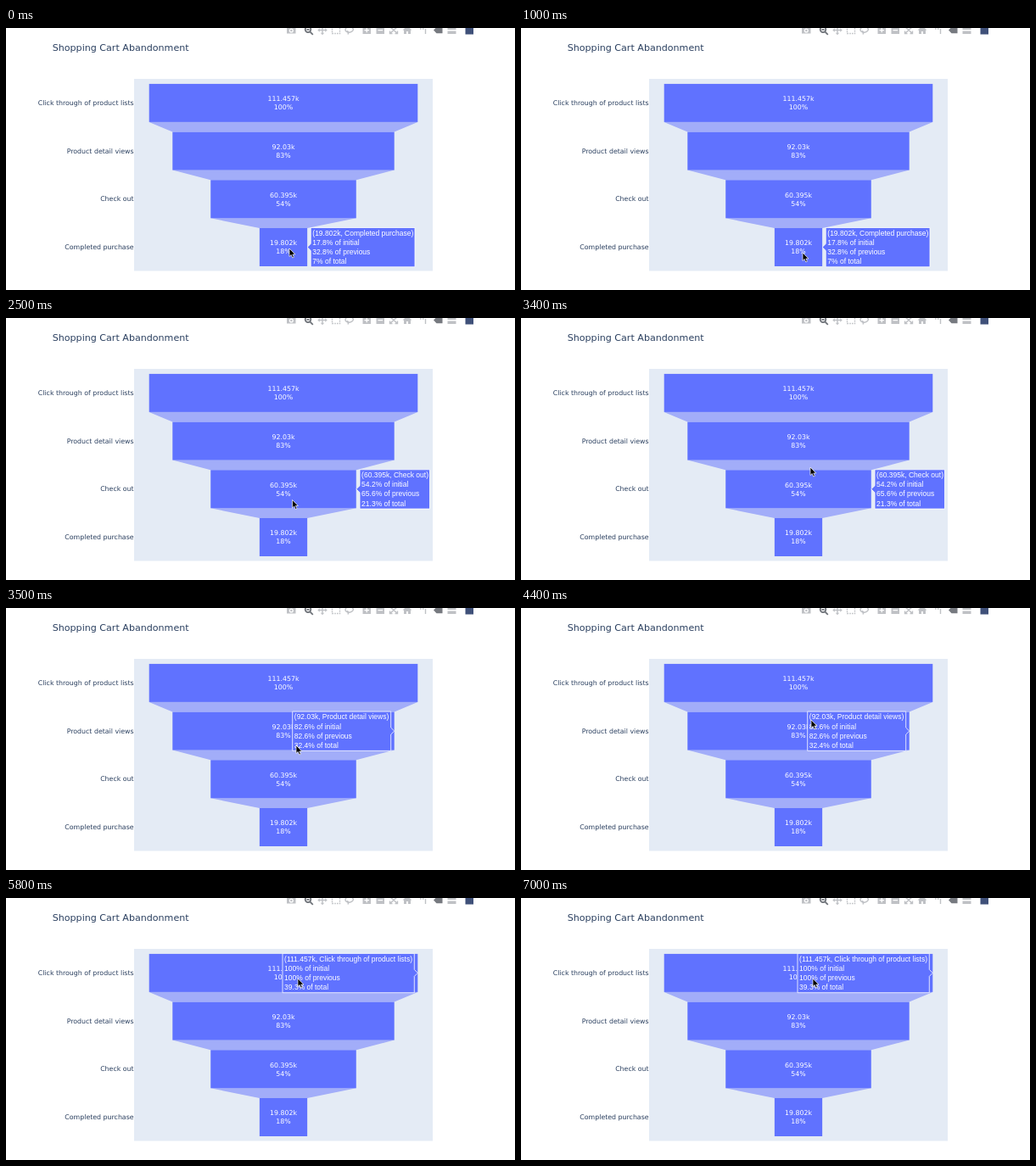
An HTML page for the animation above (7.2 s loop, 600 by 309 pixels).

```html
<!DOCTYPE html>
<html lang="en">
<head>
<meta charset="utf-8">
<title>Shopping Cart Abandonment</title>
<style>
  html, body { margin: 0; width: 100%; height: 100%; overflow: hidden; background: #fff; }
  svg { display: block; width: 600px; height: 309px; }
  text { font-family: "DejaVu Sans", Verdana, sans-serif; font-size: 7.85px; fill: #2a3f5f; }
  .title { font-size: 11.1px; }
  .tick { text-anchor: end; }
  .value { text-anchor: middle; fill: #fff; }
  .bar, .label path { fill: #6072ff; }
  .link { fill: #a2adf9; }
  .label path { stroke: #fff; stroke-width: .8; }
  .label text { font-family: "Liberation Sans", Arial, sans-serif; font-size: 8.5px; fill: #fff; }
  .tools { fill: #bfc1c5; stroke: none; }
  .tools .line { fill: none; stroke: #bfc1c5; stroke-width: 1.4; }
  .tools .cut { fill: none; stroke: #fff; stroke-width: 1.3; }
  .tools .active { fill: #777a80; }
  .tools .active-line { fill: none; stroke: #70747a; stroke-width: 1.8; }
</style>
</head>
<body>
<svg viewBox="0 0 600 309">
  <g class="tools">
    <path d="M331 0h2.500l1-1.500h4l1 1.500h2v6.500h-10.500z"/>
    <circle class="cut" cx="336.300" cy="3" r="1.900"/>
    <circle class="active-line" cx="356" cy="1.800" r="3.300"/>
    <path class="active-line" d="M358.300 4.300l3.500 3.500M354.500 1.800h3"/>
    <path class="line" d="M373 -2v9M368.500 2.500h9"/>
    <path d="M373 8.200l-2.200-2.500h4.400zM367.300 2.500l2.500-2.200v4.400zM378.700 2.500l-2.500-2.200v4.400z"/>
    <path class="line" stroke-dasharray="1.600 1.200" d="M384.500 -2v8.500h9v-8.500"/>
    <path class="line" d="M401.500 4.500c-3-2-1-6 3-6s6 3 4 5s-6 2.500-6.500 1s3-1 1 3"/>
    <path d="M420.500 -2h9.500v9h-9.500zM436.500 -2h9.500v9h-9.500z"/>
    <path class="cut" d="M425.250 0v5.200M422.500 2.600h5.500M438.500 2.600h5.500"/>
    <path class="line" d="M453 -1l8 7M461 -1l-8 7M452.500 3.500v3h3M461.500 3.500v3h-3"/>
    <path d="M467.500 2.500l5.500-5l5.500 5h-1.500v4.500h-3v-3h-2v3h-3v-4.500z"/>
    <path class="line" d="M494.500 7v-6" />
    <path class="line" stroke-dasharray="1.500 1.500" d="M488 1h6"/>
    <path class="active" d="M504 2.500l3.500-3.700h7v7.400h-7z"/>
    <path d="M520.500 -1.500h10v3.500h-10zM520.500 3.500h10v3.500h-10z"/>
    <rect x="541.500" y="-2" width="9.500" height="9.500" fill="#3f5079"/>
  </g>
  <text class="title" x="54.700" y="26.800">Shopping Cart Abandonment</text>
  <rect x="151" y="60" width="352" height="226.500" fill="#e4ebf5"/>
  <g id="funnel"></g>
  <g id="labels"></g>
  <path id="cursor" d="M0 0V9.500L2.200 7.500L3.700 11L5.400 10.300L3.900 7H6.900Z" stroke="#fff" stroke-width=".7"/>
</svg>
<script>
const CENTER = 327, BAR_HEIGHT = 45, PITCH = 56.7, FULL_WIDTH = 316.6;
const LOOP = 7200, STEP = 100;

// labelX is the left edge of the hover box; labelW its width.
const stages = [
  { name: "Click through of product lists", count: 111.457, initial: "100%", previous: "100%", total: "39.3%", labelX: 326, labelW: 155.3 },
  { name: "Product detail views", count: 92.03, initial: "82.6%", previous: "82.6%", total: "32.4%", labelX: 337.7, labelW: 116 },
  { name: "Check out", count: 60.395, initial: "54.2%", previous: "65.6%", total: "21.3%", labelX: 417, labelW: 82.5 },
  { name: "Completed purchase", count: 19.802, initial: "17.8%", previous: "32.8%", total: "7%", labelX: 359.2, labelW: 122.8 }
];

// time, cursor x, cursor y
const path = [
  [0, 334, 260], [200, 332, 265], [2100, 332, 265], [2200, 333, 258],
  [2400, 336, 229], [2600, 339, 200], [2700, 340, 190], [2900, 340, 181],
  [3200, 340, 181], [3400, 341, 176], [3500, 342, 162], [3600, 342, 149],
  [4200, 342, 149], [4400, 342, 132], [4500, 343, 114], [4600, 344, 101],
  [5000, 344, 95], [LOOP, 344, 95]
];

const text = (cls, x, y, content) => `<text class="${cls}" x="${x}" y="${y}">${content}</text>`;

stages.forEach((stage, i) => {
  stage.half = FULL_WIDTH * stage.count / stages[0].count / 2;
  stage.mid = 88.4 + PITCH * i;
});

const funnel = document.getElementById("funnel");
const labels = document.getElementById("labels");

funnel.innerHTML = stages.map(({ name, count, half, mid }, i) => {
  const next = stages[i + 1];
  const bottom = mid + BAR_HEIGHT / 2;
  const link = next ? `<path class="link" d="M${CENTER - half} ${bottom}H${CENTER + half}
    L${CENTER + next.half} ${next.mid - BAR_HEIGHT / 2}H${CENTER - next.half}Z"/>` : "";
  const percent = Math.round(100 * count / stages[0].count) + "%";
  return link +
    `<rect class="bar" x="${CENTER - half}" y="${mid - BAR_HEIGHT / 2}" width="${2 * half}" height="${BAR_HEIGHT}"/>` +
    text("tick", 150.6, mid + 2.5, name) +
    text("value", CENTER, mid - 2.2, count + "k") +
    text("value", CENTER, mid + 7.9, percent);
}).join("");

labels.innerHTML = stages.map(({ name, count, initial, previous, total, half, mid, labelX, labelW }) => {
  const tip = CENTER + half;
  const onRight = labelX > tip;
  const near = onRight ? labelX : labelX + labelW;
  const far = onRight ? labelX + labelW : labelX;
  const lines = [`(${count}k, ${name})`, `${initial} of initial`, `${previous} of previous`, `${total} of total`];
  return `<g class="label"><path d="M${tip} ${mid}L${near} ${mid - 4}V${mid - 23}H${far}V${mid + 23.3}H${near}V${mid + 4}Z"/>` +
    lines.map((line, n) => text("", labelX + 2.1, mid - 13.8 + 11.2 * n, line)).join("") + "</g>";
}).join("");

function cursorAt(t) {
  const k = path.findIndex(point => point[0] > t);
  const [t0, x0, y0] = path[k - 1], [t1, x1, y1] = path[k];
  const p = (t - t0) / (t1 - t0);
  return [x0 + (x1 - x0) * p, y0 + (y1 - y0) * p];
}

function draw() {
  const t = Math.floor(performance.now() % LOOP / STEP) * STEP;
  const [x, y] = cursorAt(t);
  const hovered = 3 - [2500, 3500, 4500].filter(start => t >= start).length;
  document.getElementById("cursor").setAttribute("transform", `translate(${x} ${y})`);
  [...labels.children].forEach((label, i) => {
    label.style.display = i === hovered ? "" : "none";
  });
  requestAnimationFrame(draw);
}
draw();
</script>
</body>
</html>
```
